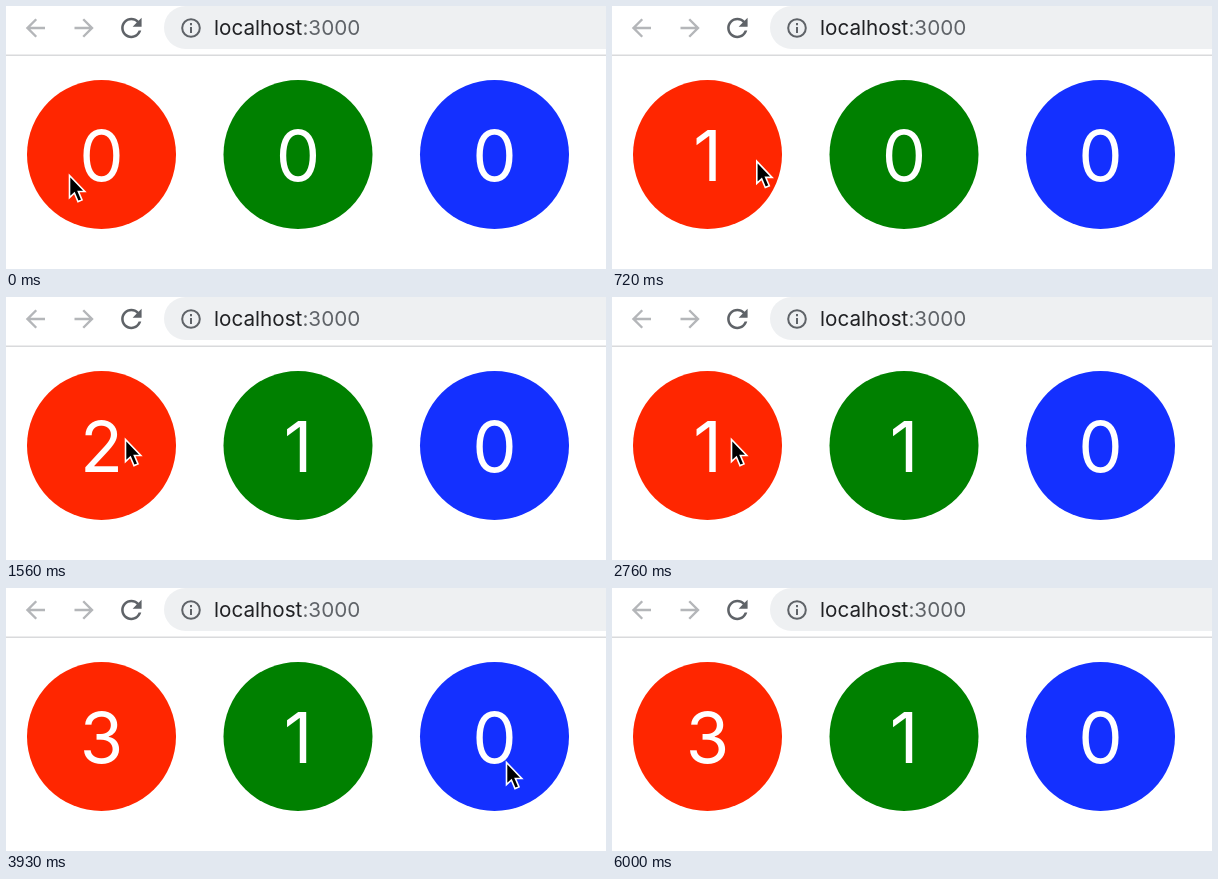
Recreate the animation shown at these times as an HTML page. Size 600 by 263 pixels, loop 6.06 s.

```html
<!DOCTYPE html>
<html lang="en">
<head>
<meta charset="utf-8">
<title>Counters</title>
<style>
  html, body { margin: 0; width: 100%; height: 100%; overflow: hidden; background: #fff; }
  svg { display: block; width: 100%; height: 100%; font-family: Inter, Roboto, sans-serif; }
  .address { font-size: 20.7px; fill: #202124; }
  .muted { fill: #5f6368; }
  .count { font-size: 70.5px; fill: #fff; text-anchor: middle; }
</style>
</head>
<body>
<svg viewBox="0 0 600 263">
  <defs>
    <path id="back" d="M20 11H7.83l5.59-5.59L12 4l-8 8 8 8 1.41-1.41L7.83 13H20z"/>
  </defs>

  <rect x="158" y="0" width="480" height="43" rx="21.5" fill="#eef0f2"/>
  <rect y="48.5" width="600" height="1.5" fill="#d9dadc"/>
  <g fill="#b4b6b9">
    <use href="#back" transform="translate(15 7.6) scale(1.2)"/>
    <use href="#back" transform="translate(92.5 7.6) scale(-1.2 1.2)"/>
  </g>
  <path class="muted" transform="translate(110 6.6) scale(1.28)" d="M17.65 6.35C16.2 4.9 14.21 4 12 4c-4.42 0-7.99 3.58-7.99 8s3.57 8 7.99 8c3.73 0 6.84-2.55 7.73-6h-2.08c-.82 2.33-3.04 4-5.65 4-3.31 0-6-2.69-6-6s2.69-6 6-6c1.66 0 3.14.69 4.22 1.78L13 11h7V4z"/>
  <circle cx="185" cy="22" r="8.8" fill="none" stroke="#5f6368" stroke-width="2"/>
  <path class="muted" d="M184 17h2v2.2h-2zM184 21h2v6h-2z"/>
  <text class="address" x="208" y="29">localhost<tspan class="muted">:3000</tspan></text>

  <circle cx="95.5" cy="148.5" r="74.5" fill="#ff2600"/>
  <circle cx="292" cy="148.5" r="74.5" fill="#008000"/>
  <circle cx="488.5" cy="148.5" r="74.5" fill="#1430ff"/>
  <text class="count" x="95.5" y="175.3">0</text>
  <text class="count" x="292" y="175.3">0</text>
  <text class="count" x="488.5" y="175.3">0</text>

  <path id="cursor" d="M.5 .5V22.6L5.4 18L9 26.6L13 24.9L9.4 16.5H15.8Z" fill="#000" stroke="#fff" stroke-width="1.6"/>
</svg>
<script>
const LOOP = 6060, STEP = 30, CURSOR_GONE = 6000;

// [time, x, y] of the pointer tip
const path = [
  [0, 63, 169], [360, 90, 154], [540, 90, 154],
  [1050, 280, 157], [1110, 280, 157], [1410, 119, 142],
  [3540, 119, 142], [3930, 500, 174], [4110, 506, 179],
  [4350, 503, 162], [LOOP, 503, 162]
];

// [time, value] for each counter: clicks, then undo and redo
const counts = [
  [[0, 0], [390, 1], [1560, 2], [1920, 3], [2220, 2], [2760, 1], [3150, 2], [3510, 3]],
  [[0, 0], [1080, 1]],
  [[0, 0], [4110, 1], [4500, 0]]
];

const labels = document.querySelectorAll('.count');
const cursor = document.getElementById('cursor');
const ease = u => u * u * (3 - 2 * u);

function pointerAt(t) {
  const i = path.findIndex(([time]) => time > t);
  const [t0, x0, y0] = path[i - 1], [t1, x1, y1] = path[i];
  const u = ease((t - t0) / (t1 - t0));
  return [x0 + (x1 - x0) * u, y0 + (y1 - y0) * u];
}

function draw(t) {
  counts.forEach((changes, i) => {
    labels[i].textContent = changes.filter(([time]) => time <= t).pop()[1];
  });
  cursor.setAttribute('transform', `translate(${pointerAt(t)})`);
  cursor.setAttribute('visibility', t < CURSOR_GONE ? 'visible' : 'hidden');
}

const start = performance.now();
function frame() {
  const t = (performance.now() - start) % LOOP;
  draw(Math.floor(t / STEP) * STEP);
  requestAnimationFrame(frame);
}
draw(0);
requestAnimationFrame(frame);
</script>
</body>
</html>
```
